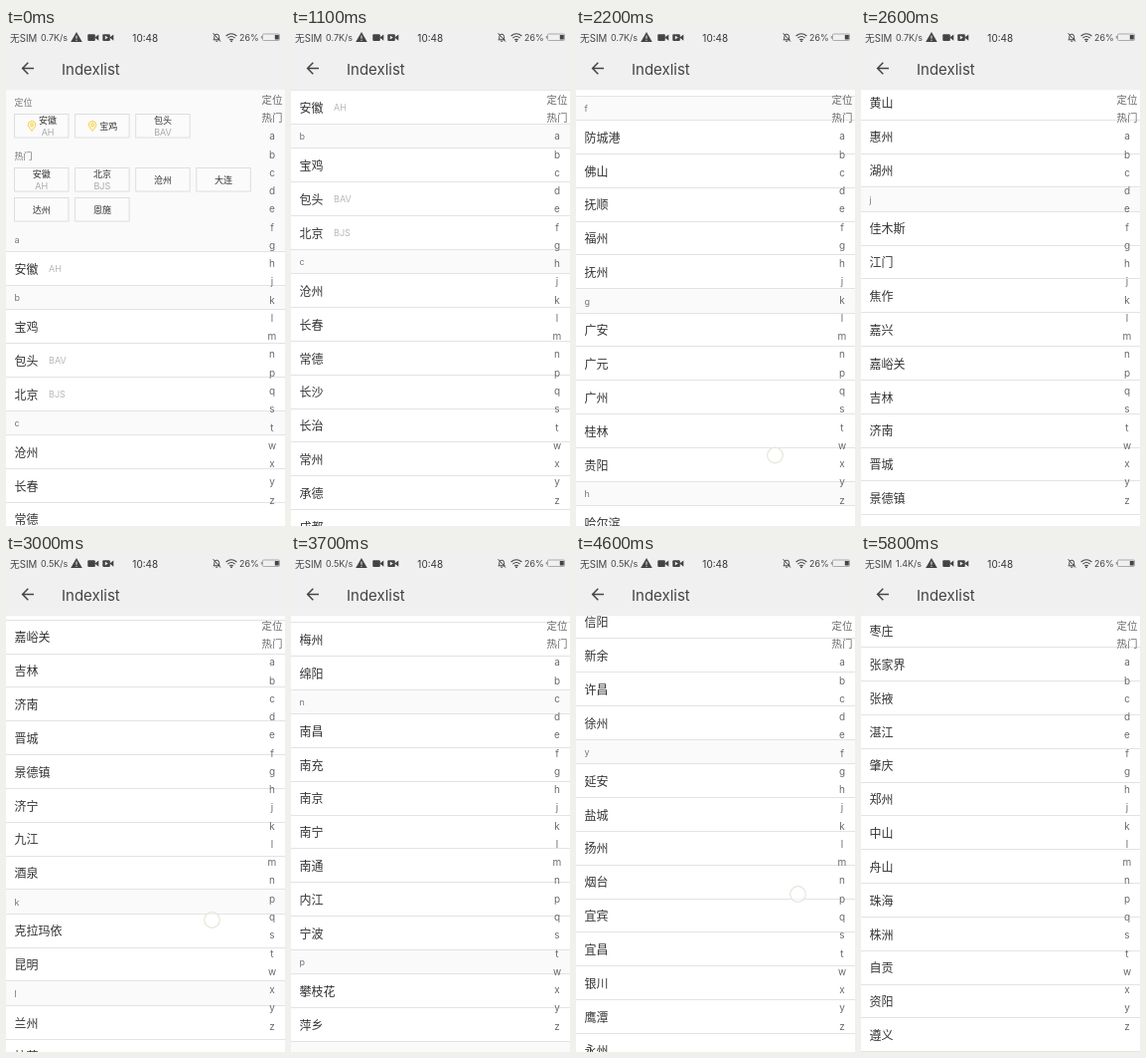
Recreate the animation shown at these times as an HTML page. Size 281 px wide and 500 px high, loop 6200 ms.

```html
<!DOCTYPE html>
<html lang="zh-CN">
<head>
<meta charset="utf-8">
<title>Indexlist</title>
<style>
  html, body { margin: 0; width: 100%; height: 100%; overflow: hidden; background: #fff; }
  svg { display: block; width: 281px; height: 500px; }
  text { font-family: Inter, "Noto Sans CJK SC", "Noto Sans CJK", "Noto Sans CJK JP", sans-serif; white-space: pre; }
  .rule { fill: #e3e3e3; shape-rendering: crispEdges; }
</style>
</head>
<body>
<svg id="stage" viewBox="0 0 281 500"></svg>
<script>
const LOOP = 6200, STEP = 100;
const ROW = 33.83, HEAD = 24.4, LIST_TOP = 200.6, BOTTOM = 500.3;

const cities = {
  a: '安徽',
  b: '宝鸡 包头 北京',
  c: '沧州 长春 常德 长沙 长治 常州 承德 成都 赤峰 滁州 重庆',
  d: '大理 大连 丹东 大庆 大同 达州 德阳 德州 东莞',
  e: '鄂尔多斯 恩施',
  f: '防城港 佛山 抚顺 福州 抚州',
  g: '广安 广元 广州 桂林 贵阳',
  h: '哈尔滨 海口 邯郸 杭州 汉中 合肥 衡阳 呼和浩特 黄山 惠州 湖州',
  j: '佳木斯 江门 焦作 嘉兴 嘉峪关 吉林 济南 晋城 景德镇 济宁 九江 酒泉',
  k: '克拉玛依 昆明',
  l: '兰州 拉萨 乐山 连云港 丽江 临沂 柳州 洛阳 泸州',
  m: '马鞍山 梅州 绵阳',
  n: '南昌 南充 南京 南宁 南通 内江 宁波',
  p: '攀枝花 萍乡',
  q: '青岛 秦皇岛 泉州 衢州',
  s: '三亚 上海 汕头 韶关 绍兴 沈阳 深圳 石家庄 苏州',
  t: '泰安 太原 泰州 唐山 天津 铜陵',
  w: '潍坊 温州 武汉 芜湖 无锡 梧州',
  x: '厦门 西安 襄阳 咸阳 西宁 信阳 新余 许昌 徐州',
  y: '延安 盐城 扬州 烟台 宜宾 宜昌 银川 鹰潭 永州 岳阳 玉林 运城',
  z: '枣庄 张家界 张掖 湛江 肇庆 郑州 中山 舟山 珠海 株洲 自贡 资阳 遵义'
};
const codes = { 安徽: 'AH', 包头: 'BAV', 北京: 'BJS' };

// cy is the visual middle of the line
const text = (x, cy, size, fill, str, anchor = 'start', extra = '') =>
  `<text x="${x}" y="${(cy + size * .37).toFixed(2)}" font-size="${size}" fill="${fill}" text-anchor="${anchor}" ${extra}>${str}</text>`;
const rect = (x, y, w, h, fill, extra = '') =>
  `<rect x="${x}" y="${y}" width="${w}" height="${h}" fill="${fill}" ${extra}/>`;
const path = (d, extra) => `<path d="${d}" ${extra}/>`;
const rule = y => `<rect class="rule" y="${(y - 1).toFixed(2)}" width="281" height="1"/>`;

const pin = (x, y) => `<g transform="translate(${x} ${y})" fill="none" stroke="#f3cf55">` +
  path('M0 5C-2 2.2 -3.8 .4 -3.8 -1.2A3.8 3.8 0 0 1 3.8 -1.2C3.8 .4 2 2.2 0 5Z', 'fill="#fff6d2"') +
  '<circle cy="-1.2" r="1.4"/></g>';

function tag(col, y, name, code, pinned) {
  const x = 8.5 + col * 61.1, mid = x + 27.3 + (pinned ? 6.3 : 0);
  return rect(x, y, 54.5, 23.5, '#fbfbfb', 'stroke="#dedede"') +
    (pinned ? pin(x + 17.5, y + 12) : '') +
    text(mid, y + (code ? 6.6 : 12), 9, '#333', name, 'middle') +
    (code ? text(mid, y + 18, 9, '#aaa', code, 'middle') : '');
}

const centre = {};
let end = LIST_TOP;

function buildList() {
  let out = rect(0, 0, 281, LIST_TOP + 1, '#fafafa') +
    text(8.5, 75, 9, '#777', '定位') + text(8.5, 129, 9, '#777', '热门') +
    tag(0, 86.5, '安徽', 'AH', true) + tag(1, 86.5, '宝鸡', '', true) + tag(2, 86.5, '包头', 'BAV') +
    tag(0, 140.5, '安徽', 'AH') + tag(1, 140.5, '北京', 'BJS') + tag(2, 140.5, '沧州') + tag(3, 140.5, '大连') +
    tag(0, 170.5, '达州') + tag(1, 170.5, '恩施');
  for (const [letter, names] of Object.entries(cities)) {
    out += rect(0, end, 281, HEAD, '#fafafa') + text(8.5, end + 12.2, 9, '#777', letter);
    if (letter !== 'a') out += rule(end);
    end += HEAD;
    out += rule(end);
    for (const name of names.split(' ')) {
      const cy = centre[name] = end + ROW / 2;
      out += text(8.5, cy + .3, 12, '#333', name);
      if (codes[name]) out += text(43, cy, 9, '#b8b8b8', codes[name]);
      end += ROW;
      out += rule(end);
    }
  }
  return out;
}

const camera = x => rect(x, 6.2, 7.5, 6.8, '#444', 'rx="1"') +
  path(`M${x + 7} 9.6L${x + 11} 6.5V12.7Z`, 'fill="#444"');

function buildBar() {
  const line = (d, w = 1) => path(d, `fill="none" stroke="#444" stroke-width="${w}"`);
  return rect(0, 0, 281, 62.3, '#f0f0f0') +
    text(4, 10, 9.7, '#444', '无SIM') +
    text(35, 10, 9, '#444', '', 'start', 'id="speed"') +
    path('M71 4L76.8 14H65.2Z', 'fill="#444"') +
    path('M71 7.6V10.8M71 11.8V12.9', 'stroke="#f0f0f0"') +
    camera(82.3) + camera(97.3) + path('M99.8 7.8L102.8 9.6L99.8 11.4Z', 'fill="#f0f0f0"') +
    text(140.3, 10, 10, '#333', '10:48', 'middle') +
    line('M208.6 11.8H215.6M209.8 11.5V8.6A2.4 2.4 0 0 1 214.6 8.6V11.5M211.2 13.2H213.2M208.6 5.2L216 13.6') +
    line('M221.6 8Q227 3.6 232.4 8M223.4 10.1Q227 7 230.6 10.1M225.2 12Q227 10.4 228.8 12', 1.1) +
    '<circle cx="227" cy="13.2" r=".9" fill="#444"/>' +
    text(235, 10, 8.9, '#444', '26%') +
    rect(258.5, 6, 17, 6.5, 'none', 'rx="1" stroke="#999" stroke-width=".8"') +
    rect(256.8, 8, 1.4, 2.5, '#999') + rect(270.8, 7, 4, 4.5, '#444') +
    line('M28 40.5H17M22.3 34.8L16.6 40.5L22.3 46.2', 1.5) +
    text(56, 41.8, 15, '#444', 'Indexlist');
}

const index = ['定位', '热门', ...Object.keys(cities)]
  .map((s, i) => text(268, 72 + i * 18.27, i < 2 ? 10.5 : 10, '#6a6a6a', s, 'middle')).join('');

document.getElementById('stage').innerHTML = rect(0, 0, 281, 500, '#fff') +
  `<g id="list">${buildList()}</g>${index}` +
  '<circle id="touch" r="7.8" fill="#fff" fill-opacity=".55" stroke="#e8e6da" stroke-width="1.2"/>' + buildBar();

const list = document.getElementById('list');
const touch = document.getElementById('touch');
const speed = document.getElementById('speed');

// [time, scroll offset]; each span is a flick that slows down
const flicks = [
  [0, 0],
  [1100, centre['安徽'] - 80],
  [1300, centre['安徽'] - 70],
  [2200, centre['防城港'] - 110],
  [3000, centre['嘉峪关'] - 83.7],
  [3700, centre['梅州'] - 86],
  [4600, centre['新余'] - 102.2],
  [5200, end - BOTTOM]
];
const touches = { 2200: [200.5, 429], 3000: [207.5, 367.5], 4600: [223.5, 341.5] };

function scrollAt(t) {
  const i = flicks.findIndex(k => k[0] > t);
  if (i < 0) return flicks[flicks.length - 1][1];
  const [t0, y0] = flicks[i - 1], [t1, y1] = flicks[i];
  return y0 + (y1 - y0) * (1 - (1 - (t - t0) / (t1 - t0)) ** 1.9);
}

const start = performance.now();
function draw() {
  const t = Math.floor(((performance.now() - start) % LOOP) / STEP) * STEP;
  list.setAttribute('transform', `translate(0 ${-scrollAt(t).toFixed(2)})`);
  speed.textContent = (t < 2900 ? '0.7' : t < 5800 ? '0.5' : '1.4') + 'K/s';
  const at = touches[t];
  touch.setAttribute('visibility', at ? 'visible' : 'hidden');
  if (at) touch.setAttribute('transform', `translate(${at})`);
  requestAnimationFrame(draw);
}
draw();
</script>
</body>
</html>
```
